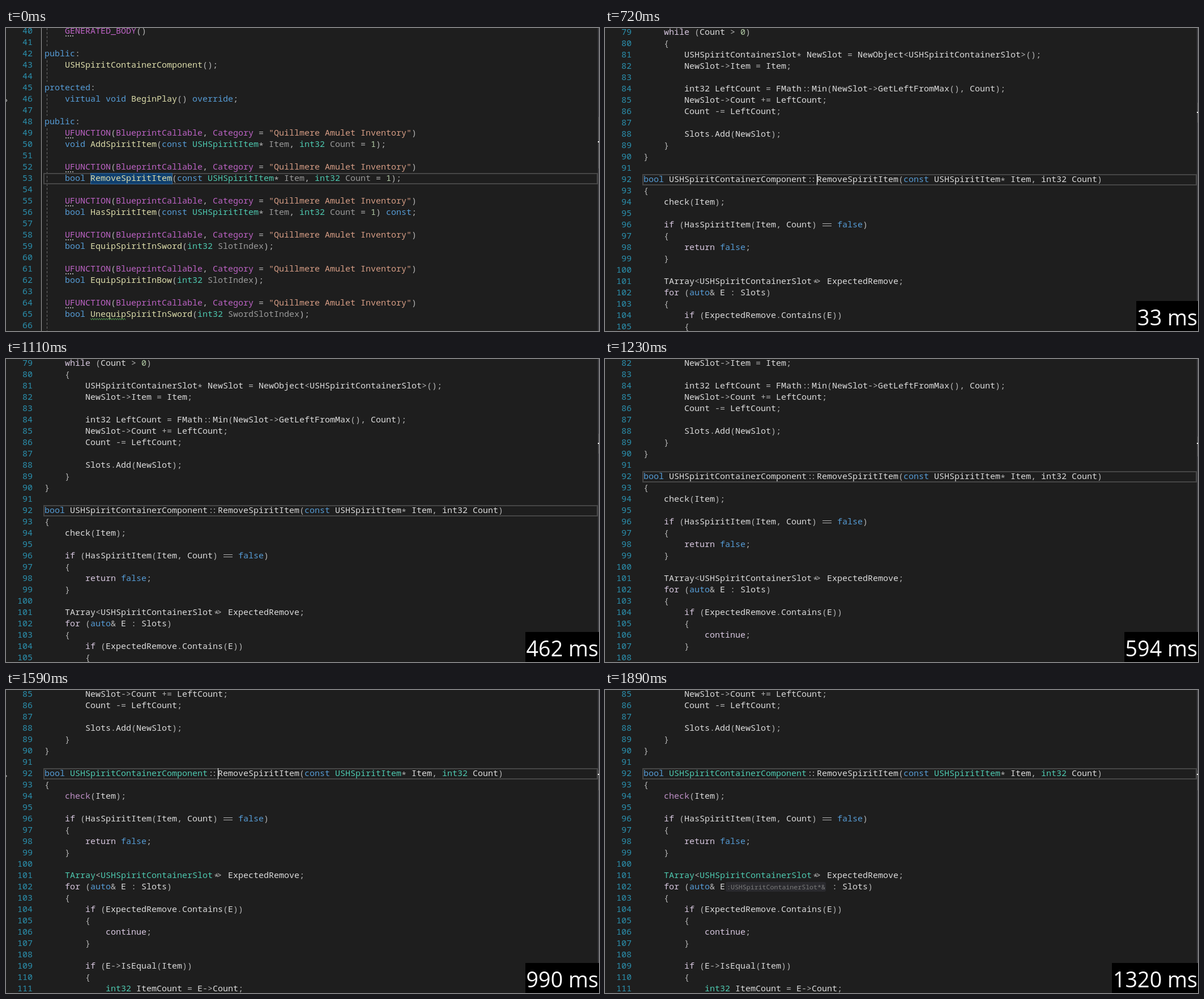
An HTML page with a canvas for the animation above (4890 ms loop, 1047x535 px).

```html
<!DOCTYPE html>
<html lang="en">
<head>
<meta charset="utf-8">
<title>Jump to definition</title>
<style>
  html, body { margin: 0; width: 100%; height: 100%; overflow: hidden; background: #1e1e1e; }
  canvas { display: block; }
</style>
</head>
<body>
<canvas id="stage" width="1047" height="535"></canvas>
<script>
const LOOP = 4890, STEP = 30, JUMP = 720;
const ROW = 20, LEFT = 68, CHAR = 9;
const MONO = '"Noto Sans Mono", "DejaVu Sans Mono", monospace';
const ctx = document.getElementById('stage').getContext('2d');

const macro = '    UFUNCTION(BlueprintCallable, Category = "Quillmere Amulet Inventory")';
const header = { first: 40, lines: `    GENERATED_BODY()

public:
    USHSpiritContainerComponent();

protected:
    virtual void BeginPlay() override;

public:
${macro}
    void AddSpiritItem(const USHSpiritItem* Item, int32 Count = 1);

${macro}
    bool RemoveSpiritItem(const USHSpiritItem* Item, int32 Count = 1);

${macro}
    bool HasSpiritItem(const USHSpiritItem* Item, int32 Count = 1) const;

${macro}
    bool EquipSpiritInSword(int32 SlotIndex);

${macro}
    bool EquipSpiritInBow(int32 SlotIndex);

${macro}
    bool UnequipSpiritInSword(int32 SwordSlotIndex);
`.split('\n') };

const source = { first: 79, lines: `    while (Count > 0)
    {
        USHSpiritContainerSlot* NewSlot = NewObject<USHSpiritContainerSlot>();
        NewSlot->Item = Item;

        int32 LeftCount = FMath::Min(NewSlot->GetLeftFromMax(), Count);
        NewSlot->Count += LeftCount;
        Count -= LeftCount;

        Slots.Add(NewSlot);
    }
}

bool USHSpiritContainerComponent::RemoveSpiritItem(const USHSpiritItem* Item, int32 Count)
{
    check(Item);

    if (HasSpiritItem(Item, Count) == false)
    {
        return false;
    }

    TArray<USHSpiritContainerSlot*> ExpectedRemove;
    for (auto& E : Slots)
    {
        if (ExpectedRemove.Contains(E))
        {
            continue;
        }

        if (E->IsEqual(Item))
        {
            int32 ItemCount = E->Count;`.split('\n') };

const KEYWORD = /^(public|protected|virtual|void|override|const|bool|false|auto)$/;
const CONTROL = /^(while|if|for|return|continue)$/;
const TYPE = /^(USH\w+|int32|TArray|FMath)$/;
const PARAM = /^(Item|Count|SlotIndex|SwordSlotIndex)$/;

function rect(color, x, y, w, h) {
  ctx.fillStyle = color;
  ctx.fillRect(x, y, w, h);
}

function colorOf(word, line, next, inHeader, semantic) {
  if (word[0] === '"') return '#d69d85';
  if (/^\d/.test(word)) return '#b5cea8';
  if (!/\w/.test(word)) return '#b4b4b4';
  if (inHeader && /UFUNCTION|GENERATED/.test(line)) return '#bd63c5';
  if (KEYWORD.test(word)) return '#569cd6';
  if (CONTROL.test(word)) return '#d8c8e0';
  if (inHeader && next === '(') return '#dcdcaa';
  if (semantic && TYPE.test(word)) return '#4ec9b0';
  if (inHeader && PARAM.test(word)) return '#9a9a9a';
  if (semantic && word === 'check') return '#bd8fc5';
  return '#dcdcdc';
}

// pairs such as :: and *> are set closer, == is one long sign, * sits mid-line
function drawToken(text, x, y) {
  if (text === '==') {
    ctx.fillRect(x + 1, y - 2, 16, 1);
    ctx.fillRect(x + 1, y + 2, 16, 1);
    return;
  }
  const squeeze = text === '::' ? 1.5 : text === '*>' ? 2 : 0;
  [...text].forEach((c, i) => {
    const drop = c === '*' ? 3 : 0;
    ctx.fillText(c, x + i * CHAR + (i ? -squeeze : squeeze), y + 5 + drop);
  });
}

function drawCode(doc, top, topY, semantic, hint) {
  ctx.font = '15px ' + MONO;
  ctx.textAlign = 'left';
  for (let n = top; n < top + 27; n++) {
    const line = doc.lines[n - doc.first], y = topY + (n - top) * ROW;
    const label = String(n);
    ctx.fillStyle = '#2b91af';
    drawToken(label, 47 - CHAR * label.length, y);
    for (const m of (line || '').matchAll(/"[^"]*"|\w+|::|==|\*>|\S/g)) {
      const end = m.index + m[0].length;
      const col = m.index + (hint && n === 102 && m.index >= 16 ? 20 : 0);
      ctx.fillStyle = colorOf(m[0], line, line[end], doc === header, semantic);
      drawToken(m[0], LEFT + col * CHAR, y);
    }
  }
}

function drawCurrentRow(y) {
  ctx.strokeStyle = '#464646';
  ctx.lineWidth = 2;
  ctx.strokeRect(67, y - 8, 977, 18);
}

function drawCaret(x, y) {
  rect('#fff', x, y - 9, 1, 19);
}

function drawScrollbar(thumbY, thumbH, markY) {
  rect('#3e3e42', 1045, 0, 2, 535);
  rect('#5a5a5a', 1046, thumbY, 1, thumbH);
  rect('#fff', 1045, markY, 2, 2);
}

function drawEdgeMark(y, r) {
  ctx.strokeStyle = '#e0e0e0';
  ctx.lineWidth = 1;
  ctx.beginPath();
  ctx.arc(-0.5, y, r, -Math.PI / 2, Math.PI / 2);
  ctx.stroke();
}

function drawOutline() {
  rect('#a5a5a5', 62, 0, 1, 535);
  ctx.strokeStyle = '#6a6a6a';
  ctx.lineWidth = 1;
  ctx.setLineDash([4, 3]);
  for (const [from, to] of [[0, 35], [57, 95], [117, 155], [177, 535]]) {
    ctx.beginPath();
    ctx.moveTo(72.5, from);
    ctx.lineTo(72.5, to);
    ctx.stroke();
  }
  ctx.setLineDash([]);
}

function drawHeader(t) {
  const y = 265;
  drawOutline();
  drawCurrentRow(y);
  rect('#10406f', 149, y - 9, 144, 19);
  ctx.strokeStyle = '#3a6a98';
  ctx.lineWidth = 1;
  ctx.strokeRect(149.5, y - 8.5, 144, 19);
  drawCode(header, 40, 5, true, false);

  header.lines.forEach((line, i) => {
    if (!/UFUNCTION|GENERATED/.test(line)) return;
    for (let k = 0; k < 4; k++) rect('#a0a0a0', 105 + k * 4, 13 + i * ROW, 2, 2);
  });

  ctx.strokeStyle = '#4f9a4f';
  ctx.beginPath();
  for (let x = 149; x <= 212; x += 2) ctx.lineTo(x, (x - 149) % 4 ? 515.5 : 512.5);
  ctx.stroke();

  if (t >= 30 && t < 390) drawCaret(257, y);
  drawEdgeMark(128, 2);
  drawScrollbar(157, 91, 200);
}

function drawHint() {
  ctx.fillStyle = '#2a2a2e';
  ctx.beginPath();
  ctx.roundRect(213, 339, 177, 17, 3);
  ctx.fill();
  ctx.font = '11.6px ' + MONO;
  ctx.fillStyle = '#7c7c7c';
  ctx.fillText(':USHSpiritContainerSlot*&', 215, 352);
}

function drawCounter(t) {
  const steps = Math.min(40, Math.floor((t - JUMP) / STEP) + 1);
  const text = steps * 33 + ' ms';
  const left = Math.round(938 - 21.5 * (text.length - 5));
  rect('#000', left, 482, 1047 - left, 53);
  ctx.font = '37.7px "Open Sans", "Noto Sans", sans-serif';
  ctx.textAlign = 'right';
  ctx.fillStyle = '#fff';
  ctx.fillText(text, 1046, 525);
}

function drawSource(t) {
  const notches = (t >= 1140) + (t >= 1380);
  const top = 79 + notches * 3, y = 7 + (92 - top) * ROW;
  const hint = t >= 1830;
  drawCurrentRow(y);
  drawCode(source, top, 7, t >= 1500, hint);
  if (hint) drawHint();

  // blink half-period is 360 ms, cut short by the jump
  if (t < 1770 && Math.floor((t - 690) / 360) % 2 === 0) drawCaret(374, y);
  if (notches === 2 && !hint) drawEdgeMark(152, 1.5);
  drawScrollbar(132 + notches * 5, 35, 148);
  drawCounter(t);
}

function frame() {
  const t = performance.now() % LOOP;
  rect('#1e1e1e', 0, 0, 1047, 535);
  if (t < JUMP) drawHeader(t);
  else drawSource(t);
  requestAnimationFrame(frame);
}
frame();
</script>
</body>
</html>
```
